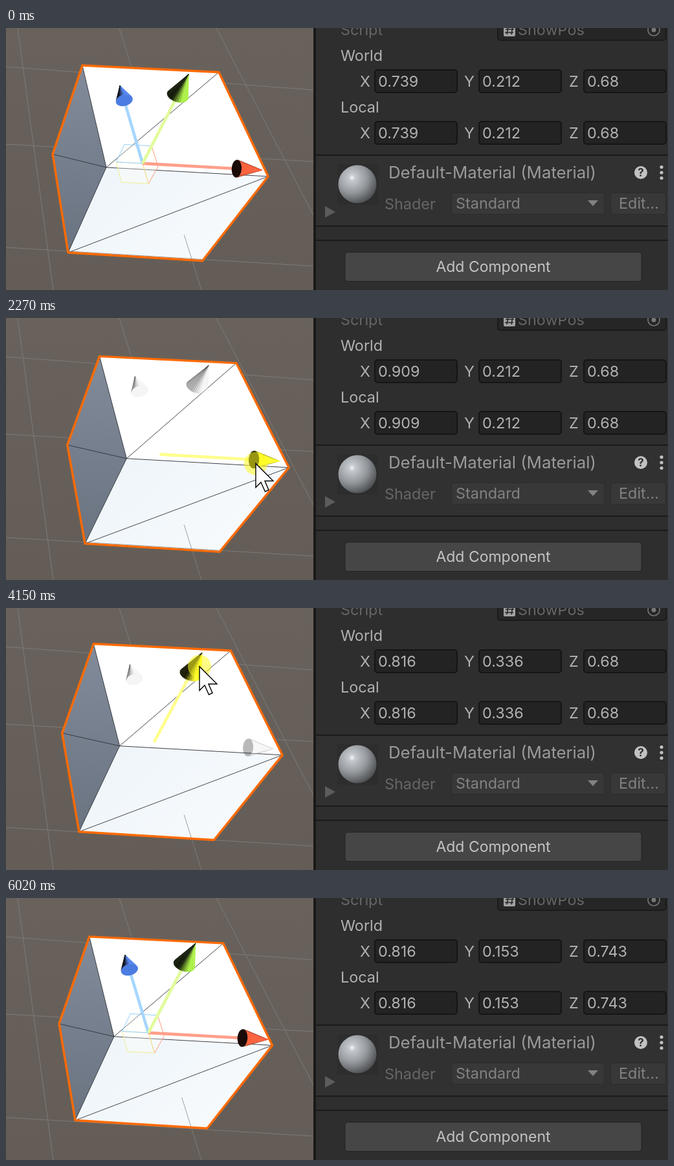
Animation of 1023 by 406 pixels, one loop 6.77 s. Source, as an HTML page with a canvas:

```html
<!DOCTYPE html>
<html lang="en">
<head>
<meta charset="utf-8">
<title>Dragging a cube</title>
<style>
  html, body { margin: 0; width: 1023px; height: 406px; overflow: hidden; background: #2e2e2e; }
  svg, canvas { position: absolute; left: 0; top: 0; display: block; }
  text { font: 23.4px Inter, Roboto, sans-serif; fill: #b2b2b2; }
  .field { fill: #232323; stroke: #151515; stroke-width: 2; }
  .button { fill: #383838; stroke: #2b2b2b; }
  .dim { fill: #828282; }
  .faint { fill: #666; }
</style>
</head>
<body>
<svg width="1023" height="406">
  <defs>
    <radialGradient id="ball" cx=".36" cy=".33" r=".72">
      <stop offset="0" stop-color="#f4f7f9"/><stop offset=".12" stop-color="#c4c9ce"/>
      <stop offset=".55" stop-color="#94989c"/><stop offset="1" stop-color="#4a4c4e"/>
    </radialGradient>
  </defs>
  <rect x="475" width="4" height="406" fill="#191919"/>
  <rect x="479" y="197" width="544" height="110" fill="#313131"/>
  <path d="M479 197H1023M479 307H1023M479 329H1023" stroke="#1a1a1a" stroke-width="2"/>

  <text x="517" y="11" class="faint">Script</text>
  <rect x="760" y="-20" width="260" height="39" rx="4" fill="#262626" stroke="#1b1b1b" stroke-width="2"/>
  <rect x="769" y="-6" width="18" height="19" rx="2" fill="#a2a2a2"/>
  <path d="M776-2L774 10M783-2L781 10M772 2H785M771 7H784" stroke="#262626" stroke-width="1.6"/>
  <text x="791" y="11" class="faint">ShowPos</text>
  <circle cx="1001" cy="3" r="9" fill="none" stroke="#777" stroke-width="1.6"/>
  <circle cx="1001" cy="3" r="3.5" fill="#777"/>

  <text x="517" y="51">World</text>
  <text x="517" y="131">Local</text>
  <g id="fields"></g>

  <rect x="512" y="211" width="63" height="63" fill="#2d2d2d"/>
  <circle cx="543" cy="242" r="29.5" fill="url(#ball)"/>
  <text x="591" y="233" style="font-size:25.8px;fill:#9a9a9a">Default-Material (Material)</text>
  <circle cx="981" cy="224" r="10" fill="#c2c2c2"/>
  <text x="981" y="230" text-anchor="middle" style="font-size:17px;font-weight:700;fill:#313131">?</text>
  <g fill="#c2c2c2"><circle cx="1013" cy="215.500" r="2.6"/><circle cx="1013" cy="224" r="2.6"/><circle cx="1013" cy="232.500" r="2.6"/></g>
  <path d="M493 276L509 285L493 294Z" fill="#5c5c5c"/>
  <text x="585" y="281" class="faint">Shader</text>
  <rect x="688.5" y="255.5" width="236" height="33" rx="4" class="button"/>
  <text x="695" y="280" class="dim">Standard</text>
  <path d="M899 267H915L907 276Z" fill="#828282"/>
  <rect x="934.5" y="255.5" width="85" height="33" rx="4" class="button"/>
  <text x="947" y="280" class="dim">Edit...</text>

  <rect x="524" y="347.500" width="458" height="45" rx="4" fill="#464646" stroke="#232323"/>
  <text x="753" y="378" text-anchor="middle" style="font-size:23px;fill:#c4c4c4">Add Component</text>
</svg>
<canvas id="stage" width="1023" height="406"></canvas>
<script>
const LOOP = 6770, STEP = 70, TEXT_LAG = 130, VIEW_W = 475;
const ctx = document.getElementById('stage').getContext('2d');

// Bursts of movement [start, end]; the picture rests between them.
const bursts = [[390, 1020], [1150, 1710], [1840, 2480], [2550, 3110],
                [3240, 3860], [3930, 4560], [4630, 5250], [5320, 5950], [6020, 6020]];

// Position over time, one track per axis: [ms, value]
const tracks = [
  [[1220, .739], [1840, .891], [2050, .935], [2410, .816]],
  [[3240, .212], [3590, -.082], [3620, -.09], [3790, .489], [3860, .455], [4240, .153]],
  [[4630, .68], [4700, .616], [4780, .68], [4900, .905], [5190, 1.34], [5320, 1.27], [5460, .8], [5530, .51], [5740, .743]]
];
// Drags: axis, start, end, grab offset from the cone base
const drags = [[0, 1150, 2480, 3, 6], [1, 3240, 4350, 14, -12], [2, 4630, 5740, 15, -8]];
const pointer = [[390, 675, 385], [600, 500, 285], [750, 362, 202], [820, 341, 192], [880, 336, 204],
                 [1020, 361, 224], [2480, 378, 225], [2900, 303, 110], [3110, 297, 95],
                 [4350, 292, 104], [4560, 209, 113], [5740, 206, 105], [5950, 416, 250]];

const axes = [[1, 0, 0], [0, -1, 0], [0, 0, 1]];
const colors = [[251, 95, 58], [172, 240, 70], [80, 132, 240]];
const hoverColors = [[255, 94, 66], [152, 255, 45], [64, 116, 255]];
const shafts = ['#ff9f8a', '#e2fb9c', '#a6d6ff'];
const planes = ['#ff9a80', '#eeee90', '#94ceff'];
const light = [.5, -.8, -.6];

const add = (a, b, k = 1) => a.map((v, i) => v + b[i] * k);
const dot = (a, b) => a.reduce((sum, v, i) => sum + v * b[i], 0);

function sample(keys, t) {
  const i = keys.findIndex(k => k[0] > t);
  if (i === 0) return keys[0].slice(1);
  if (i < 0) return keys[keys.length - 1].slice(1);
  const a = keys[i - 1], b = keys[i], f = (t - a[0]) / (b[0] - a[0]);
  return a.slice(1).map((v, j) => v + (b[j + 1] - v) * f);
}
const positionAt = t => tracks.map(k => sample(k, t)[0]);

// Camera; the origin is the nearest cube corner at its first position, y points down.
const depth = ([x, y, z]) => 1 - .01 * x + .2 * y + .182 * z;
function project(p) {
  const [x, y, z] = p, w = depth(p);
  return [(155 + 246 * x - 39.8 * y - 15.5 * z) / w, (216 + 11.7 * x + 201.6 * y - 147.4 * z) / w];
}

function path(points, close = true) {
  ctx.beginPath();
  points.forEach(p => ctx.lineTo(...p));
  if (close) ctx.closePath();
}
function fill(points, style) { path(points); ctx.fillStyle = style; ctx.fill(); }
function stroke(points, style, width, close = false) {
  path(points, close);
  ctx.strokeStyle = style;
  ctx.lineWidth = width;
  ctx.stroke();
}

function drawGrid(style) {
  [[0, 60, 475, 96], [0, 180, 475, 207], [0, 340, 475, 369],
   [18, 0, 73, 406], [175, 0, 302, 406], [325, 0, 475, 290]]
    .forEach(([a, b, c, d]) => stroke([[a, b], [c, d]], style, 1));
}

function drawCube(o) {
  const corner = (x, y, z) => project(add(o, [x, y, z]));
  const near = corner(0, 0, 0), a = corner(0, 0, 1), b = corner(1, 0, 1), c = corner(1, 0, 0),
        d = corner(1, 1, 0), e = corner(0, 1, 0), f = corner(0, 1, 1);
  const side = ctx.createLinearGradient(a[0], a[1], e[0], e[1]);
  side.addColorStop(0, '#828b9a');
  side.addColorStop(1, '#6a7380');
  const front = ctx.createLinearGradient(near[0], near[1], d[0], d[1]);
  front.addColorStop(0, '#eff5fa');
  front.addColorStop(1, '#f6fafd');
  fill([a, near, e, f], side);
  fill([near, c, d, e], front);
  fill([a, b, c, near], '#fff');

  // The ground grid shows in front of the part of the cube below it.
  ctx.save();
  path([near, c, d, e]);
  ctx.clip();
  const y = 320 - 174 * o[2];
  path([[0, y - 16], [VIEW_W, y + 12], [VIEW_W, 406], [0, 406]]);
  ctx.clip();
  drawGrid('#9aa0a4');
  ctx.restore();

  [[near, a], [near, c], [near, e], [near, b], [near, f], [e, c]].forEach(l => stroke(l, '#30343a', .9));
  ctx.lineJoin = 'round';
  stroke([a, b, c, d, e, f], '#ff6a00', 3.4, true);
}

function drawCone(axis, base, tip, radius, color) {
  const dir = axes[axis], u = axes[(axis + 1) % 3], v = axes[(axis + 2) % 3], N = 28;
  const end = project(tip);
  const normal = i => add(u.map(n => n * Math.cos(i / N * 2 * Math.PI)), v, Math.sin(i / N * 2 * Math.PI));
  const ring = Array.from({ length: N }, (_, i) => project(add(base, normal(i), radius)));
  const shade = n => {
    const k = Math.min(1, .1 + 1.4 * Math.max(0, dot(n, light)));
    return `rgb(${color.map(ch => Math.round(ch * k))})`;
  };
  const cross = (o, p, q) => (p[0] - o[0]) * (q[1] - o[1]) - (p[1] - o[1]) * (q[0] - o[0]);
  ring.forEach((p, i) => {
    const q = ring[(i + 1) % N];
    if (cross(end, p, q) <= 0) return;
    const style = shade(normal(i + .5));
    fill([end, p, q], style);
    stroke([end, p, q], style, .5, true);
  });
  if (cross(ring[0], ring[9], ring[18]) < 0) fill(ring, shade(dir.map(n => -n)));
}

function drawCursor(x, y) {
  const shape = [[0, 0], [0, 37], [8, 29], [14.5, 43.5], [20, 41], [14, 27], [27, 27]];
  const points = shape.map(p => add(p, [x, y]));
  ctx.lineJoin = 'miter';
  fill(points, '#fff');
  stroke(points, '#000', 1.4, true);
}

function draw(t) {
  const [px, py, pz] = positionAt(t);
  const cube = [px - .739, .212 - py, pz - .68];
  const pivot = add(cube, [.5, .5, .5]), size = depth(pivot) / 1.186;
  const along = (axis, k) => add(pivot, axes[axis], k * size);
  const grips = [0, 1, 2].map(i => project(along(i, .69)));
  const tips = [0, 1, 2].map(i => project(along(i, .875)));
  const drag = drags.find(d => t >= d[1] && t <= d[2]);
  const active = drag ? drag[0] : -1;
  const shown = t >= 390 && t < 6020;
  const cursor = drag ? add(grips[active], drag.slice(3)) : sample(pointer, t);
  const reach = i => Math.min(...[grips[i], tips[i]].map(p => Math.hypot(p[0] - cursor[0], p[1] - cursor[1])));
  const hover = shown && !drag ? [0, 1, 2].find(i => reach(i) < 33) : -1;

  ctx.clearRect(0, 0, 1023, 406);
  ctx.save();
  ctx.beginPath();
  ctx.rect(0, 0, VIEW_W, 406);
  ctx.clip();
  const back = ctx.createLinearGradient(0, 0, 0, 406);
  back.addColorStop(0, '#69625c');
  back.addColorStop(1, '#645d57');
  ctx.fillStyle = back;
  ctx.fillRect(0, 0, VIEW_W, 406);
  drawGrid('#7d7a77');
  drawCube(cube);

  if (!drag) {
    const arms = [[-1, 0, 0], [0, -1, 0], [0, 0, -1]];
    planes.forEach((style, i) => {
      const u = arms[(i + 1) % 3], v = arms[(i + 2) % 3], k = .195 * size;
      const quad = [pivot, add(pivot, u, k), add(add(pivot, u, k), v, k), add(pivot, v, k)].map(project);
      fill(quad, 'rgba(255,255,245,.3)');
      stroke(quad, style, 1, true);
    });
  }
  [2, 0, 1].forEach(i => {
    const on = i === active;
    if (!drag || on) stroke([project(pivot), grips[i]], on ? '#ffff8c' : shafts[i], 4.6);
    const color = on ? [255, 255, 45] : drag ? [235, 235, 235] : i === hover ? hoverColors[i] : colors[i];
    ctx.globalAlpha = drag && !on ? .3 : 1;
    drawCone(i, along(i, .69), along(i, .875), (i === hover ? .073 : .066) * size, color);
    ctx.globalAlpha = 1;
  });
  ctx.restore();

  if (drag) {
    ctx.beginPath();
    ctx.arc(...cursor, 18, 0, 2 * Math.PI);
    ctx.fillStyle = 'rgba(255,250,30,.55)';
    ctx.fill();
  }
  if (shown) drawCursor(...cursor);

  positionAt(t - TEXT_LAG).forEach((v, i) => {
    const label = String(+v.toFixed(3));
    values[i].forEach(node => { node.textContent = label; });
  });
}

const values = [[], [], []];
const fields = document.getElementById('fields');
function svg(tag, attributes, text = '') {
  const node = document.createElementNS(fields.namespaceURI, tag);
  for (const key in attributes) node.setAttribute(key, attributes[key]);
  node.textContent = text;
  return fields.appendChild(node);
}
[64, 144].forEach(y => [569, 730, 892].forEach((x, i) => {
  svg('rect', { x: x + 1, y: y + 1, width: 127, height: 35, rx: 4, class: 'field' });
  svg('text', { x: x - 22, y: y + 27 }, 'XYZ'[i]);
  values[i].push(svg('text', { x: x + 6, y: y + 27 }));
}));

function stepped(t) {
  const burst = bursts.filter(b => b[0] <= t).pop();
  if (!burst) return 0;
  return Math.min(burst[1], burst[0] + Math.floor((t - burst[0]) / STEP) * STEP);
}
function frame() {
  draw(stepped(performance.now() % LOOP));
  requestAnimationFrame(frame);
}
frame();
</script>
</body>
</html>
```
